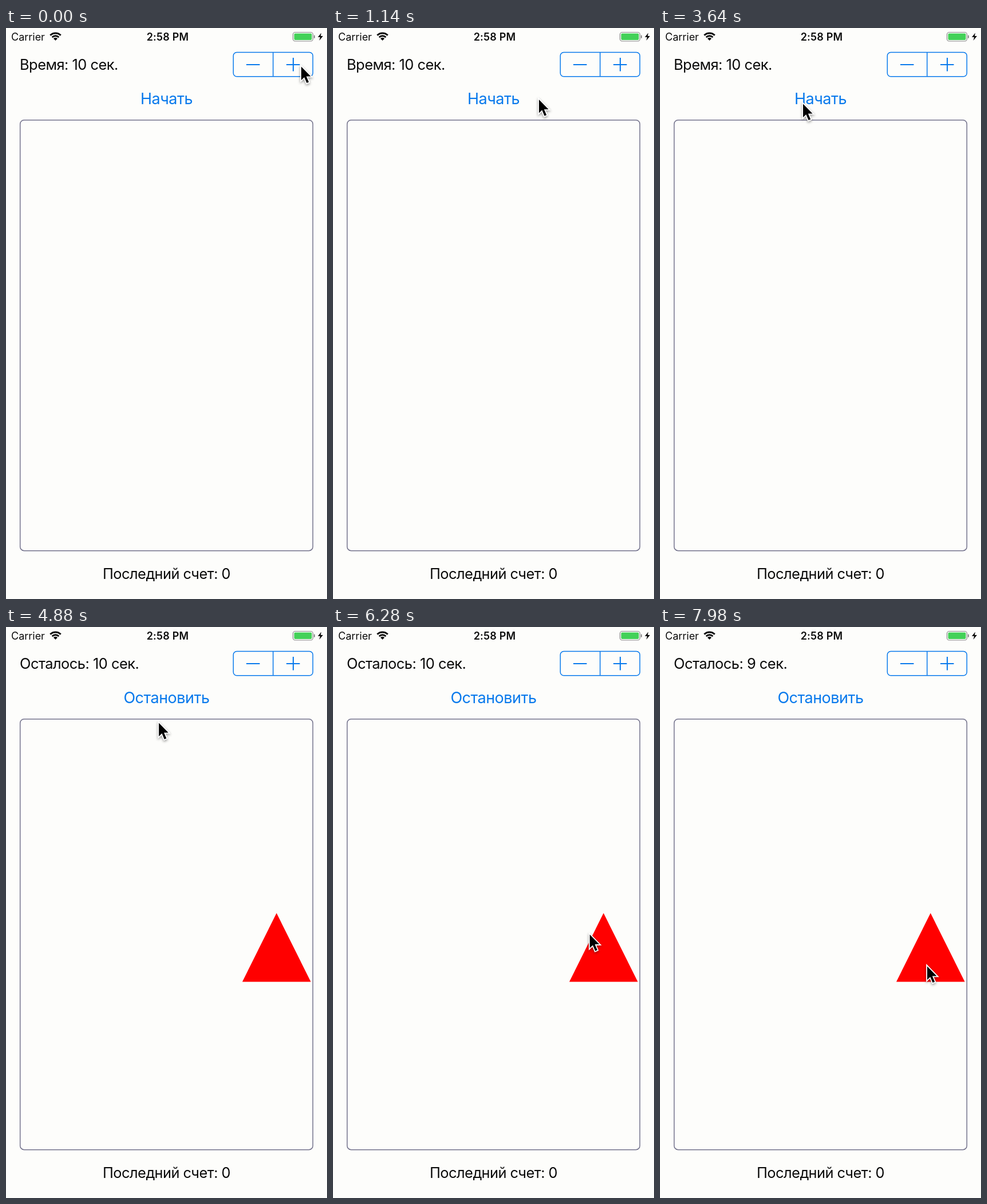
Write an HTML page with a canvas that moves like this. It is 561 px wide and 997 px high and loops after 8 s.

```html
<!DOCTYPE html>
<html lang="ru">
<head>
<meta charset="utf-8">
<title>Счет</title>
<style>
html, body { margin: 0; width: 100%; height: 100%; overflow: hidden; background: #fdfdfb; }
canvas { display: block; width: 561px; height: 997px; }
</style>
</head>
<body>
<canvas id="stage" width="561" height="997"></canvas>
<script>
const ctx = document.getElementById('stage').getContext('2d');
const LOOP = 8000, START = 4420, TICK = 7000;
const BLUE = '#0879ec', INK = '#0a0a0a', BG = '#fdfdfb', GREY = '#8a8a8a';

const smooth = u => u * u * (3 - 2 * u);
const easeOut = power => u => 1 - (1 - u) ** power;

// The vertical move of the first swing settles sooner, which bends its path
const moves = [
  { start: 800, end: 1700, x: 262, y: 143, easeX: easeOut(2), easeY: easeOut(3) },
  { start: 1800, end: 2400, x: 250, y: 132.5 },
  { start: 4500, end: 6740, x: 473, y: 586.5 },
  { start: 6760, end: 7300, x: 467, y: 592.5 }
];

function pointer(t) {
  let x = 516, y = 67.5;
  for (const { start, end, x: toX, y: toY, easeX = smooth, easeY = smooth } of moves) {
    const u = Math.min(1, Math.max(0, (t - start) / (end - start)));
    x += (toX - x) * easeX(u);
    y += (toY - y) * easeY(u);
  }
  return [x, y];
}

function text(str, x, y, size, { color = INK, align = 'left', weight = 400, spacing = -0.5 } = {}) {
  ctx.font = `${weight} ${size}px Inter, "Noto Sans", sans-serif`;
  ctx.letterSpacing = spacing + 'px';
  ctx.textAlign = align;
  ctx.fillStyle = color;
  ctx.fillText(str, x, y);
}

function poly(...pts) {
  ctx.beginPath();
  for (let i = 0; i < pts.length; i += 2) ctx.lineTo(pts[i], pts[i + 1]);
  ctx.closePath();
}

function box(x, y, w, h, r, color, line) {
  ctx.beginPath();
  ctx.roundRect(x, y, w, h, r);
  if (line) {
    ctx.strokeStyle = color;
    ctx.lineWidth = line;
    ctx.stroke();
  } else {
    ctx.fillStyle = color;
    ctx.fill();
  }
}

function rect(x, y, w, h, color) {
  ctx.fillStyle = color;
  ctx.fillRect(x, y, w, h);
}

function wifi(x, y) {
  const from = -Math.PI * 0.75, to = -Math.PI * 0.25;
  ctx.fillStyle = ctx.strokeStyle = INK;
  ctx.beginPath();
  ctx.moveTo(x, y);
  ctx.arc(x, y, 5, from, to);
  ctx.fill();
  ctx.lineWidth = 3;
  for (const r of [8.2, 13]) {
    ctx.beginPath();
    ctx.arc(x, y, r, from, to);
    ctx.stroke();
  }
}

function statusBar() {
  text('Carrier', 9, 22, 18, { spacing: 0 });
  wifi(86.5, 22);
  text('2:58 PM', 282.5, 22, 18, { align: 'center', weight: 600, spacing: 0.2 });
  box(501.5, 7.5, 35, 15.5, 4, GREY, 1.2);
  box(503.5, 9.5, 31, 11.5, 2, '#43d158');
  box(538, 12.5, 2, 5.5, 1, GREY);
  poly(551, 8.5, 545, 16, 549, 16, 547.5, 22, 554, 14, 550, 14);
  ctx.fillStyle = INK;
  ctx.fill();
}

function stepper() {
  box(397.3, 42.4, 139, 42.3, 6, BLUE, 1.5);
  rect(466, 42, 1.5, 43, BLUE);
  rect(420, 63, 23.5, 2, BLUE);
  rect(490, 63, 23.5, 2, BLUE);
  rect(501, 52, 2, 23.5, BLUE);
}

function cursor(x, y) {
  ctx.save();
  ctx.translate(x, y);
  poly(0, 0, 0, 23.5, 5.3, 18.4, 9.6, 28.6, 13.2, 27, 8.9, 17, 16.6, 17);
  ctx.miterLimit = 3;
  ctx.lineWidth = 3.6;
  ctx.strokeStyle = '#fff';
  ctx.shadowColor = 'rgba(0,0,0,.4)';
  ctx.shadowBlur = 4;
  ctx.shadowOffsetY = 2;
  ctx.stroke();
  ctx.shadowColor = 'transparent';
  ctx.fillStyle = '#000';
  ctx.fill();
  ctx.restore();
}

function draw(t) {
  const running = t >= START;
  const label = running ? `Осталось: ${t < TICK ? 10 : 9} сек.` : 'Время: 10 сек.';
  rect(0, 0, 561, 997, BG);
  statusBar();
  text(label, 24, 73, 25.4);
  stepper();
  text(running ? 'Остановить' : 'Начать', 280.5, 133, 27, { color: BLUE, align: 'center' });
  box(24.7, 160.7, 511.6, 752, 7, '#73728c', 1.5);
  if (running) {
    poly(472.8, 499.5, 532.7, 619.5, 413, 619.5);
    ctx.fillStyle = '#f00';
    ctx.fill();
  }
  text('Последний счет: 0', 280.5, 962, 25.4, { align: 'center' });
  cursor(...pointer(t));
}

const t0 = performance.now();
function frame() {
  draw((performance.now() - t0) % LOOP);
  requestAnimationFrame(frame);
}
frame();
</script>
</body>
</html>
```
